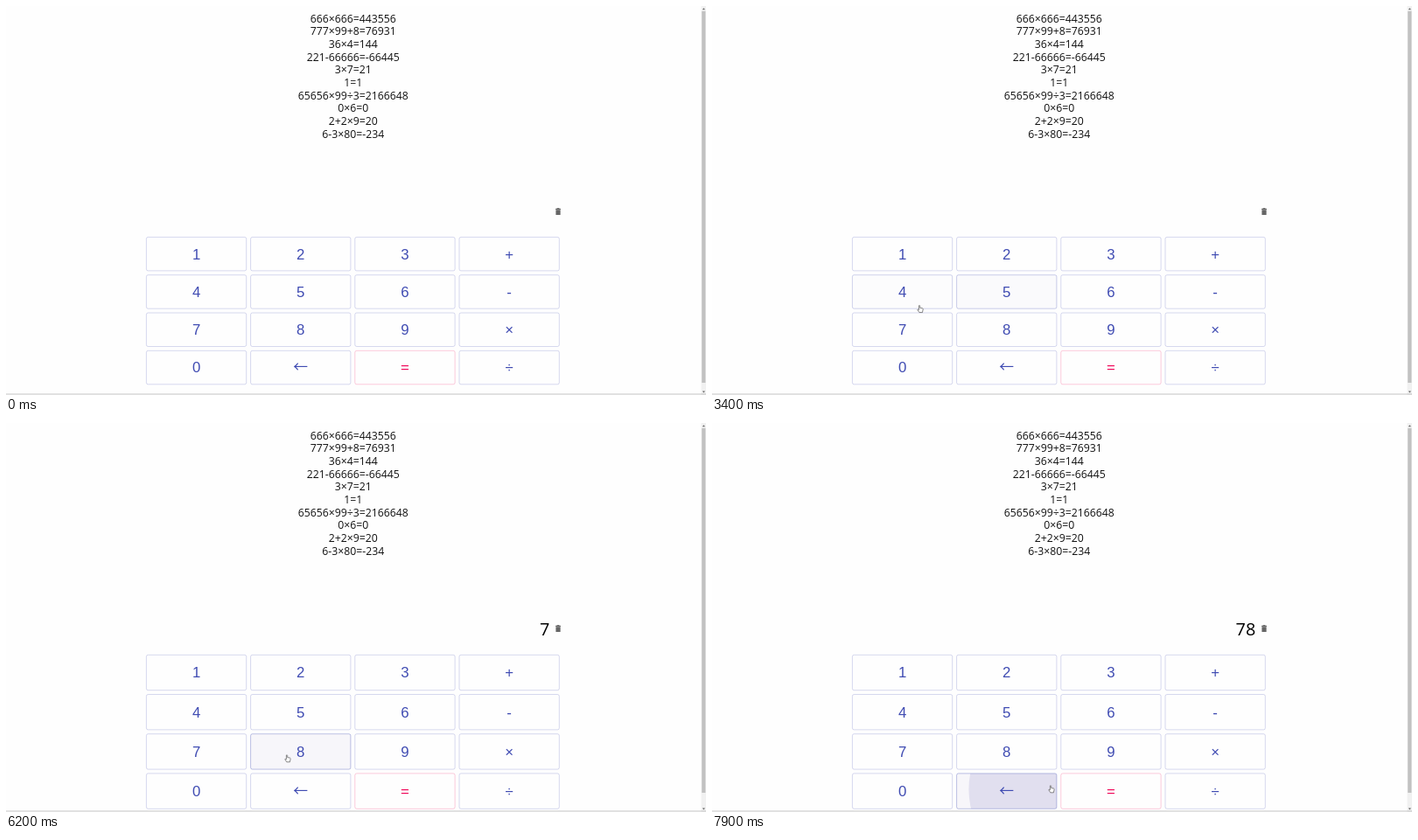
Recreate the animation shown at these times as an HTML page with a canvas. Size 800x445 px, loop 8000 ms.

```html
<!DOCTYPE html>
<html lang="en">
<head>
<meta charset="utf-8">
<title>Calculator</title>
<style>
html, body { margin: 0; width: 100%; height: 100%; overflow: hidden; background: #fefefe; }
canvas { display: block; }
</style>
</head>
<body>
<canvas id="stage" width="800" height="445"></canvas>
<script>
const ctx = document.getElementById('stage').getContext('2d');
const LOOP = 8000, STEP = 100, HOVER_LAG = 200, RIPPLE = 650;
const BLUE = '63,75,178', PINK = '240,5,90', TINT = '70,65,160';
const KEYS = [...'123+456-789×0←=÷'];
const HISTORY = ['666×666=443556', '777×99+8=76931', '36×4=144', '221-66666=-66445', '3×7=21',
  '1=1', '65656×99÷3=2166648', '0×6=0', '2+2×9=20', '6-3×80=-234'];

// Pointer trips; a trip with a key presses it on arrival
const TRIPS = [
  { from: 100, to: 300, x: 490, y: 188 },
  { from: 2700, to: 3600, x: 225, y: 355 },
  { from: 4000, to: 4600, x: 313, y: 387 },
  { from: 4900, to: 5100, x: 237, y: 376, key: '7' },
  { from: 5300, to: 5800, x: 322, y: 384 },
  { from: 6500, to: 6560, x: 322, y: 384, key: '8' },
  { from: 6600, to: 6950, x: 448, y: 378, key: '9' },
  { from: 7000, to: 7200, x: 383, y: 416 },
  { from: 7500, to: 7560, x: 388, y: 419, key: '←' },
];
const PRESSES = TRIPS.filter(trip => trip.key);

const clamp = v => Math.max(0, Math.min(1, v));
const easeOut = k => 1 - (1 - k) ** 2;

function recordedTime(t) {
  t = Math.floor(t / STEP) * STEP;
  const trip = TRIPS.filter(m => m.from <= t).pop();
  return trip ? Math.min(t, trip.to + (trip.key ? 450 : 0)) : t;
}

function pointerAt(t) {
  return TRIPS.reduce((p, m) => {
    const k = easeOut(clamp((t - m.from) / (m.to - m.from)));
    return { x: p.x + (m.x - p.x) * k, y: p.y + (m.y - p.y) * k };
  }, { x: 488, y: 160 });
}

function entryAt(t) {
  return PRESSES.filter(p => p.to + STEP <= t)
    .reduce((text, p) => p.key === '←' ? text.slice(0, -1) : text + p.key, '');
}

function keyBox(i, tall) {
  const pitch = tall ? 45.2 : 43.3;
  return {
    x: 160.4 + i % 4 * 119.2, y: (tall ? 265.3 : 264.4) + Math.floor(i / 4) * pitch,
    w: 114.3, h: pitch - 4.8,
  };
}

// Hover follows the pointer late and fades over a short window
function hoverLevel(t, box) {
  let level = 0;
  for (let d = -30; d <= 30; d += 20) {
    const p = pointerAt(t - HOVER_LAG + d);
    if (p.x > box.x && p.x < box.x + box.w && p.y > box.y && p.y < box.y + box.h) level += .25;
  }
  return level;
}

function rect(color, x, y, w, h) {
  ctx.fillStyle = color;
  ctx.fillRect(x, y, w, h);
}

function label(text, x, y, font, color, align) {
  ctx.font = font;
  ctx.fillStyle = color;
  ctx.textAlign = align;
  ctx.fillText(text, x, y);
}

function drawRipple(age, press, { x, y, w, h }) {
  if (age < 0 || age > RIPPLE) return;
  const reach = Math.hypot(Math.max(press.x - x, x + w - press.x), Math.max(press.y - y, y + h - press.y));
  ctx.fillStyle = `rgba(${TINT},${.14 * clamp(age / 120) * clamp((RIPPLE - age) / 350)})`;
  ctx.beginPath();
  ctx.arc(press.x, press.y, reach * easeOut(clamp(age / 550)), 0, 7);
  ctx.fill();
}

function drawKey(t, key, i, tall) {
  const box = keyBox(i, tall), { x, y, w, h } = box;
  const hover = hoverLevel(t, box);
  const pink = key === '=';
  const outline = new Path2D();
  outline.roundRect(x, y, w, h, 2);
  ctx.save();
  ctx.clip(outline);
  rect(`rgba(${pink ? PINK : TINT},${.04 * hover})`, x, y, w, h);
  PRESSES.filter(p => p.key === key).forEach(p => drawRipple(t - p.to, p, box));
  ctx.restore();
  ctx.strokeStyle = `rgba(${pink ? PINK : BLUE},${.23 + .15 * hover})`;
  ctx.lineWidth = .9;
  ctx.stroke(outline);
  const face = key === '←' ? '"Noto Sans CJK JP", "Noto Sans CJK SC"' : '"Liberation Sans", Arial';
  label(key, x + w / 2, y + h / 2 + 5.9, `16.8px ${face}, sans-serif`, `rgb(${pink ? PINK : BLUE})`, 'center');
}

function drawScrollbar(tall) {
  rect('#f1f1f1', 794.6, 0, 5.4, 445);
  rect('#c1c1c1', 795.2, 6, 4.2, tall ? 417 : 425);
  ctx.fillStyle = '#666';
  ctx.fill(new Path2D('M795.8 4.2h3.2l-1.6-2zM795.8 440.5h3.2l-1.6 2z'));
  rect('#b4b4b4', 0, 443.6, 800, .8);
}

function drawTrash() {
  rect('#555', 628, 231.8, 6, 1);
  rect('#555', 629.6, 231.2, 2.8, 1);
  rect('#666', 628.4, 233.2, 5.2, 5.8);
}

function drawPointer({ x, y }) {
  const overKeys = y > 264;
  const shape = new Path2D(overKeys
    ? 'M-1.6-4q1-.7 1.3.4V-1.4L2.6-.9Q3.3-.6 3.1.3L2.4 3.8H-1.2L-3.2.8q0-1.2 1.6 0z'
    : 'M-1.2-3V2.4L.1 1.3.9 3.3 1.8 2.9 1 1H2.6z');
  ctx.save();
  ctx.translate(x, y);
  ctx.fillStyle = '#fff';
  ctx.strokeStyle = '#555';
  ctx.lineWidth = .7;
  ctx.fill(shape);
  ctx.stroke(shape);
  ctx.restore();
}

function draw(now) {
  const t = recordedTime(now % LOOP);
  const entry = entryAt(t);
  const tall = entry !== '';
  rect('#fefefe', 0, 0, 800, 445);
  HISTORY.forEach((line, i) =>
    label(line, 396.8, 18.5 + i * 14.67, '12.25px "Open Sans", sans-serif', '#111', 'center'));
  label(entry, 621.2, 243.2, '19.8px "Open Sans", sans-serif', '#000', 'right');
  drawTrash();
  KEYS.forEach((key, i) => drawKey(t, key, i, tall));
  drawScrollbar(tall);
  if (t >= TRIPS[0].from) drawPointer(pointerAt(t));
  requestAnimationFrame(draw);
}
requestAnimationFrame(draw);
</script>
</body>
</html>
```
